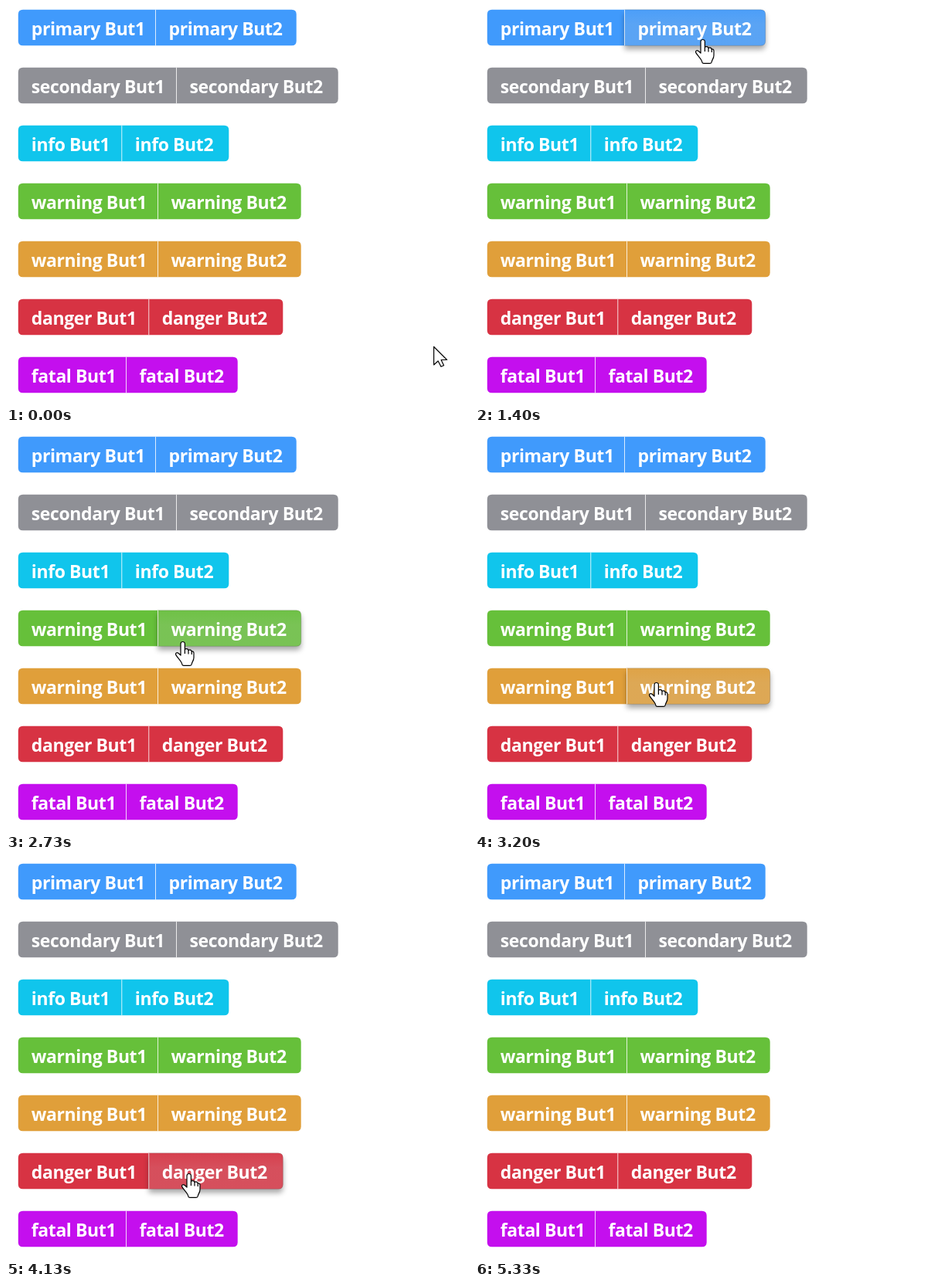
An HTML page for the animation above (5540 ms loop, 599 px wide and 517 px high).

```html
<!DOCTYPE html>
<html lang="en">
<head>
<meta charset="utf-8">
<title>Button groups</title>
<style>
  html, body { margin: 0; width: 100%; height: 100%; overflow: hidden; background: #fff; }
  svg { display: block; }
  text { font: 700 23px "Open Sans", "Noto Sans", sans-serif; letter-spacing: -0.4px; fill: #fff; }
</style>
</head>
<body>
<svg width="599" height="517" viewBox="0 0 599 517">
  <defs>
    <filter id="blur" x="-20%" y="-50%" width="140%" height="200%"><feGaussianBlur stdDeviation="3.6"/></filter>
    <linearGradient id="sheen" x1="0" y1="0" x2="0" y2="1">
      <stop offset="0" stop-color="#d0d0d0" stop-opacity=".08"/>
      <stop offset=".4" stop-color="#d0d0d0" stop-opacity=".18"/>
    </linearGradient>
  </defs>
  <g id="rows"></g>
  <g id="cursor" fill="#fff" stroke="#000" stroke-width="1.2" stroke-linejoin="round">
    <path id="arrow" d="M.5 .5V24L6 19L9.8 26.3L13.4 24.7L10 17.5H17.5Z"/>
    <g id="hand">
      <path d="M-3 3.2C-3-.4 2.4-.4 2.4 3.2V10.5C3.5 8.9 6.6 9.4 7 11.6C8.4 10.3 10.7 11 11.2 13C12.7 12.3 14 13.4 14 15.2V21C14 25 11.6 26.5 11.2 29.5Q11 31.4 9 31.4H1Q-1 31.4-1.4 29C-2 26-7 21.5-9.3 17.4C-10.2 15.2-8 13.7-6 15.2L-3 18Z"/>
      <path fill="none" d="M2.4 10.5V16M7 11.6V16.5M11.2 13V17"/>
    </g>
  </g>
</svg>
<script>
const LOOP = 5540, STEP = 200 / 3, LAST_STEP = 80, FADE_STEPS = 2;
const LEFT = 15.8, TOP = 4.8, PITCH = 75, HEIGHT = 46.5, RADIUS = 6, PAD = 17;
const DIGIT_GAIN = 4.5; // a "2" button is this much wider than its "1"

const ROWS = [
  { name: "primary", fill: "#409afc", width: 177.7 },
  { name: "secondary", fill: "#8f9096", width: 204.7 },
  { name: "info", fill: "#10c5ec", width: 134 },
  { name: "warning", fill: "#66c03a", width: 180.7 },
  { name: "warning", fill: "#e09f3a", width: 180.7 },
  { name: "danger", fill: "#d73343", width: 169 },
  { name: "fatal", fill: "#c40fee", width: 139.7 }
];

// turning points of the pointer: time, x, y
const PATH = [
  [0, 553, 441], [600, 209, 101], [1000, 90, 32], [1400, 295, 43],
  [1800, 66, 175], [2200, 68, 178], [2500, 262, 245], [3000, 165, 294],
  [3200, 235, 323], [3600, 84, 384], [3733, 84, 389], [4200, 250, 410],
  [4500, 180, 440], [4600, 141, 481], [4850, 134, 482], [5130, 238, 502],
  [5340, 246, 545]
];

const $ = id => document.getElementById(id);

function add(parent, tag, attrs, label) {
  const el = document.createElementNS("http://www.w3.org/2000/svg", tag);
  for (const key in attrs) el.setAttribute(key, attrs[key]);
  if (label) el.textContent = label;
  return parent.appendChild(el);
}

// box rounded on its outer side only; dir is 1 when that side is the left
function box(outer, inner, y, dir) {
  const r = RADIUS, b = y + HEIGHT, x = outer + dir * r;
  return `M${inner} ${y}H${x}Q${outer} ${y} ${outer} ${y + r}V${b - r}Q${outer} ${b} ${x} ${b}H${inner}Z`;
}

function addButton(label, fill, x0, x1, y, dir) {
  const g = add($("rows"), "g", {});
  const d = dir > 0 ? box(x0, x1, y, dir) : box(x1, x0, y, dir);
  const shadow = add(g, "path", { d, transform: "translate(0 5)", filter: "url(#blur)" });
  add(g, "path", { d, fill });
  const glow = add(g, "path", { d, fill: "url(#sheen)", stroke: "#000", "stroke-opacity": .13 });
  add(g, "text", { x: x0 + PAD, y: y + 33.2 }, label);
  return { x0, x1, y, shadow, glow };
}

const buttons = ROWS.flatMap(({ name, fill, width }, i) => {
  const y = TOP + i * PITCH, split = LEFT + width, right = split + width + DIGIT_GAIN;
  const pair = [
    addButton(name + " But1", fill, LEFT, split, y, 1),
    addButton(name + " But2", fill, split, right, y, -1)
  ];
  add($("rows"), "path", { d: `M${split} ${y}v${HEIGHT}`, stroke: "#fff", "stroke-opacity": .75 });
  return pair;
});

function slope(i, c) {
  const a = PATH[Math.max(i - 1, 0)], b = PATH[Math.min(i + 1, PATH.length - 1)];
  return (b[c] - a[c]) / (b[0] - a[0]);
}

// smooth curve through the turning points
function pointer(t) {
  const i = PATH.findIndex((p, k) => k === PATH.length - 2 || t < PATH[k + 1][0]);
  const a = PATH[i], b = PATH[i + 1], span = b[0] - a[0];
  const u = (t - a[0]) / span, v = 1 - u;
  return [1, 2].map(c =>
    v * v * ((1 + 2 * u) * a[c] + u * span * slope(i, c)) +
    u * u * ((1 + 2 * v) * b[c] - v * span * slope(i + 1, c)));
}

const inside = (b, [x, y]) => x >= b.x0 && x < b.x1 && y >= b.y && y < b.y + HEIGHT;

function render(ms) {
  const last = Math.min(LAST_STEP, Math.floor((ms % LOOP + 4) / STEP));
  const track = Array.from({ length: last + 1 }, (_, k) => pointer(k * STEP));
  const spot = track[last];
  for (const b of buttons) {
    const heat = track.reduce((h, p) => Math.max(0, Math.min(FADE_STEPS, h + (inside(b, p) ? 1 : -1))), 0);
    const s = heat / FADE_STEPS;
    b.shadow.setAttribute("opacity", s * .34);
    b.glow.setAttribute("opacity", s * s);
  }
  const over = buttons.some(b => inside(b, spot));
  $("arrow").style.display = over ? "none" : "";
  $("hand").style.display = over ? "" : "none";
  $("cursor").setAttribute("transform", `translate(${spot.map(Math.round)})`);
}

const start = performance.now();
function tick() {
  render(performance.now() - start);
  requestAnimationFrame(tick);
}
tick();
</script>
</body>
</html>
```
